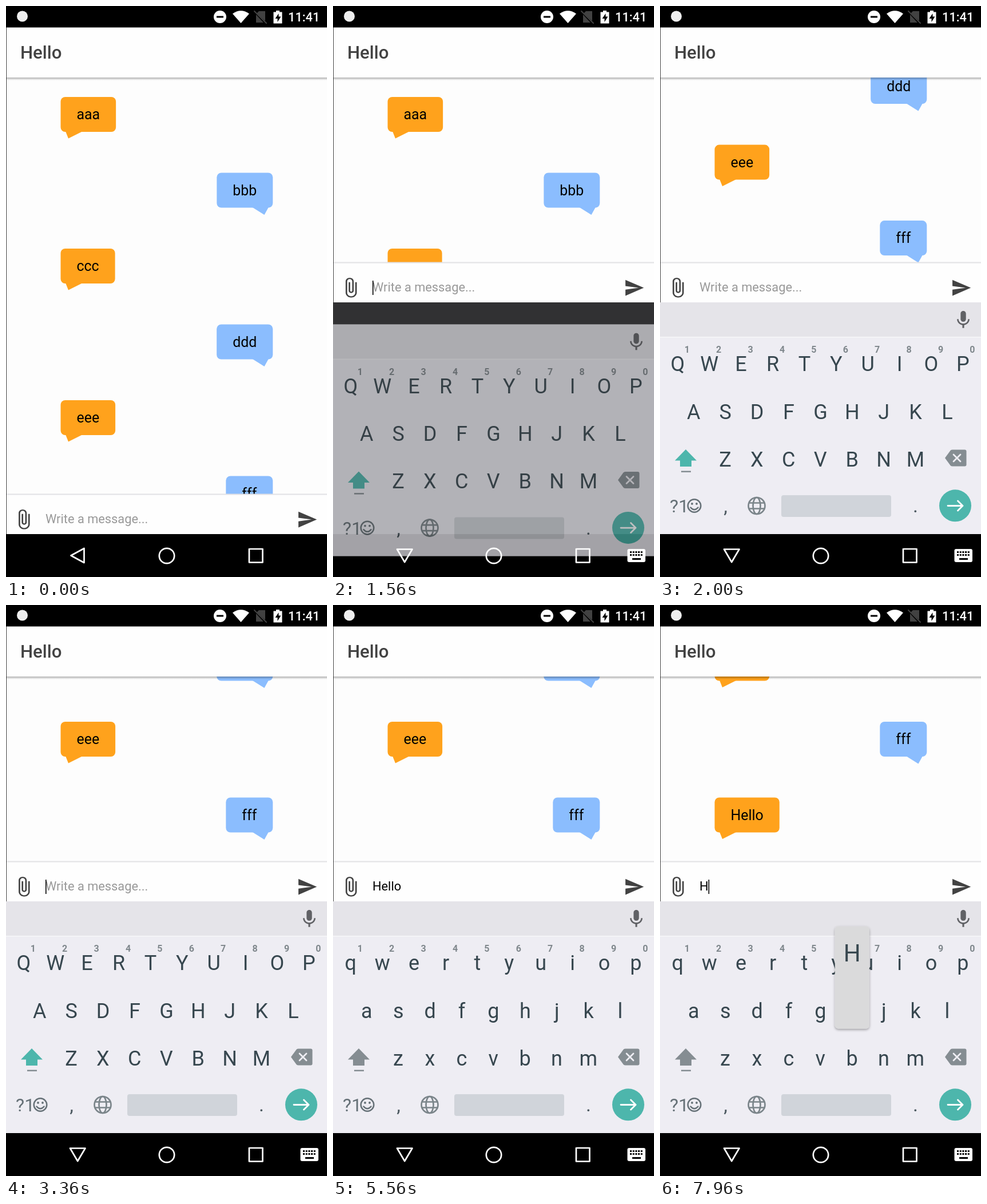
An HTML page for the animation above (8 s loop, 561x998 px).

```html
<!DOCTYPE html>
<html lang="en">
<head>
<meta charset="utf-8">
<title>Chat</title>
<style>
  html, body { margin: 0; width: 100%; height: 100%; overflow: hidden; background: #000; }
  svg { display: block; width: 100%; height: 100%; font-family: Roboto, sans-serif; }
  .mid { text-anchor: middle; }
  .key { font-size: 36px; fill: #37474f; }
  .hint { font-size: 16px; font-weight: 700; fill: #7f878c; }
  .line { fill: none; stroke-linejoin: round; stroke-linecap: round; }
</style>
</head>
<body>
<svg viewBox="0 0 561 998">
  <defs>
    <linearGradient id="down" x2="0" y2="1"><stop stop-color="#000" stop-opacity=".3"/><stop offset="1" stop-color="#000" stop-opacity="0"/></linearGradient>
    <clipPath id="view"><rect id="viewRect" y="125" width="561" height="729"/></clipPath>
    <filter id="lift" x="-20%" y="-10%" width="140%" height="120%"><feDropShadow dx="0" dy="2" stdDeviation="2" flood-opacity=".35"/></filter>
  </defs>

  <rect y="37" width="561" height="886" fill="#313133"/>
  <rect id="page" y="37" width="561" height="886" fill="#fdfdfd"/>
  <g clip-path="url(#view)"><g id="list"></g></g>

  <rect y="37.5" width="561" height="87.5" fill="#fefefe"/>
  <rect y="125" width="561" height="5" fill="url(#down)"/>
  <text x="24.9" y="92" font-size="31.2" font-weight="500" fill="#424242">Hello</text>

  <g id="bar">
    <rect y="853" width="561" height="70" fill="#fefefe"/>
    <rect y="852.5" width="561" height="2" fill="#e2e2e5"/>
    <path transform="translate(9.7 878.4) scale(1.77 1.57)" fill="#424242" d="M16.5 6v11.5c0 2.21-1.79 4-4 4s-4-1.79-4-4V5c0-1.38 1.12-2.5 2.5-2.5s2.5 1.12 2.5 2.5v10.5c0 .55-.45 1-1 1s-1-.45-1-1V6H10v9.5c0 1.38 1.12 2.5 2.5 2.5s2.5-1.12 2.5-2.5V5c0-2.21-1.79-4-4-4S7 2.79 7 5v12.5c0 3.04 2.46 5.5 5.5 5.5s5.5-2.46 5.5-5.5V6z"/>
    <text id="hintText" x="69" y="904" font-size="21.8" fill="#999">Write a message...</text>
    <text id="typed" x="69" y="904" font-size="21.8"></text>
    <rect id="caret" x="69" y="885" width="1.6" height="25"/>
    <path transform="translate(508 879) scale(1.53 1.55)" fill="#424242" d="M2 21 23 12 2 3v7l15 2-15 2z"/>
  </g>
  <rect y="37" width="1" height="886" fill="#444"/>

  <rect width="561" height="37.5"/>
  <g fill="#fff">
    <circle cx="28.5" cy="18" r="9.5" fill="#eee"/>
    <circle cx="374" cy="19" r="11"/>
    <rect x="368" y="17.5" width="12" height="3" fill="#000"/>
    <path d="M396 13.5Q410.500 3 425 13.500L410.500 30z"/>
    <path fill="#424242" d="M442 9h11v17l-15-13zM437 15l13 14H437z"/>
    <path class="line" stroke="#424242" stroke-width="2" d="m434 9 21 21"/>
    <path d="M472 8h6v2.500h4.500V30.500h-15V10.500H472z"/>
    <path fill="#000" d="M476.500 13 470.500 22h4v6l6-9.500h-4z"/>
    <text x="493" y="27" font-size="21.8" font-weight="500">11:41</text>
  </g>

  <rect y="923" width="561" height="75"/>
  <g id="board"></g>
  <g class="line" stroke="#fff" stroke-width="2.7">
    <path id="back"/>
    <circle cx="281" cy="961" r="13.200"/>
    <rect x="425" y="949" width="23.500" height="23.500"/>
  </g>
  <g id="imeIcon">
    <rect x="514.500" y="949" width="31.500" height="23" rx="3" fill="#fff"/>
    <path stroke="#000" stroke-width="3" stroke-dasharray="3 1.700" d="M519 954.500h23M519 959.500h23"/>
    <path stroke="#000" stroke-width="3" d="M523 966.500h15"/>
  </g>
  <g id="popup">
    <rect x="-30" width="60" height="179" rx="6" fill="#dadadb" filter="url(#lift)"/>
    <text id="popupText" class="mid" y="61" font-size="42" fill="#37474f"></text>
  </g>
</svg>
<script>
const $ = id => document.getElementById(id);
const LOOP = 8000, PITCH = 132.5, BAR_LIFT = 405;
const FOCUS = 1360, RESIZE = 1495, SENT = 6460;

// press, insert, release, character
const strokes = [
  [3530, 3630, 3700, 'H'],
  [3930, 4030, 4100, 'e'],
  [4460, 4530, 4600, 'l'],
  [4800, 4870, 4940, 'l'],
  [4960, 5060, 5130, 'o'],
  [7830, 7930, LOOP, 'H']
];

const rows = [
  { keys: 'qwertyuiop', x: 30.8, y: 638 },
  { keys: 'asdfghjkl', x: 58.8, y: 721.5 },
  { keys: 'zxcvbnm', x: 114, y: 804.5 }
];
const keyPos = {};

const bubble = (text, i) => {
  const right = i % 2;
  const y = 159 + i * PITCH;
  return `<g data-right="${right}" transform="translate(0 ${y})">
    <rect height="61" rx="8"/><path/>
    <text y="39" font-size="24.9" fill="#000">${text}</text></g>`;
};

function buildList() {
  $('list').innerHTML = ['aaa', 'bbb', 'ccc', 'ddd', 'eee', 'fff', 'Hello'].map(bubble).join('');
  for (const g of $('list').children) {
    const right = g.dataset.right === '1';
    const [box, tail, text] = g.children;
    const width = text.getComputedTextLength() + 56;
    const x = right ? 466.3 - width : 95.5;
    g.setAttribute('fill', right ? '#8bbdfe' : '#ffa21c');
    box.setAttribute('x', x);
    box.setAttribute('width', width);
    text.setAttribute('x', x + 28);
    tail.setAttribute('d', right ? 'M430 60 451.500 73.500 459 60z' : 'M104 60 109 72.500 134 60z');
  }
}

function buildBoard() {
  let letters = '';
  rows.forEach(({ keys, x, y }, r) => [...keys].forEach((c, i) => {
    const kx = x + i * 55.4;
    keyPos[c] = [kx, y];
    letters += `<text class="key mid letter" x="${kx}" y="${y}">${c}</text>`;
    if (r === 0) letters += `<text class="hint mid" x="${kx + 16.5}" y="606">${(i + 1) % 10}</text>`;
  }));
  $('board').innerHTML = `
    <rect y="518" width="561" height="405" fill="#eeedf3"/>
    <rect y="518" width="561" height="60" fill="#e5e4e9"/>
    <rect y="578" width="561" height="1.500" fill="#f7f7f9"/>
    <path transform="translate(511.300 530) scale(1.560)" fill="#606165" d="M12 14c1.660 0 3-1.340 3-3V5c0-1.660-1.340-3-3-3S9 3.340 9 5v6c0 1.660 1.340 3 3 3zm5.300-3c0 3-2.540 5.100-5.300 5.100S6.700 14 6.700 11H5c0 3.410 2.720 6.230 6 6.720V21h2v-3.280c3.280-.48 6-3.300 6-6.720z"/>
    ${letters}
    <path id="shift" d="M45 775 64 794.500H55V805H35V794.500H26z"/>
    <rect x="37" y="812.500" width="17" height="2.500" fill="#858d92"/>
    <path fill="#858d92" d="M498 790 507.500 777Q509 775.500 511 775.500H532.500Q535.500 775.500 535.500 778.500V801.500Q535.500 804.500 532.500 804.500H511Q509 804.500 507.500 803z"/>
    <path class="line" stroke="#eeedf3" stroke-width="2.800" d="m513 784 12 12m0-12-12 12"/>
    <text x="17" y="885" font-size="32" fill="#667177">?1</text>
    <g class="line" stroke="#667177" stroke-width="2.500">
      <circle cx="60" cy="873.500" r="11.300"/>
      <path d="M53.500 876.500q6.500 7.500 13 0"/>
    </g>
    <g fill="#667177"><circle cx="56" cy="870" r="1.900"/><circle cx="64" cy="870" r="1.900"/></g>
    <text class="mid" x="114.500" y="886" font-size="34" fill="#4d5a61">,</text>
    <text class="mid" x="446.500" y="885" font-size="34" fill="#4d5a61">.</text>
    <g class="line" stroke="#7b858a" stroke-width="2.700">
      <circle cx="169" cy="873.500" r="14.500"/><ellipse cx="169" cy="873.500" rx="6.500" ry="14.500"/>
      <path d="M156 868.500h26M156 878.500h26"/>
    </g>
    <rect x="212" y="855" width="192" height="38" rx="4" fill="#d0d4da"/>
    <circle cx="516" cy="873.300" r="28" fill="#4db6ac"/>
    <path class="line" stroke="#fff" stroke-width="2.800" d="M503 873.500h26m-8.500-8.500 8.500 8.500-8.500 8.500"/>`;
}

const progress = (t, start, length) => Math.min(1, Math.max(0, (t - start) / length));
const easeOut = (p, power) => 1 - (1 - p) ** power;
const show = (el, on) => el.setAttribute('visibility', on ? 'visible' : 'hidden');
let upper = null;

function setCase(on) {
  if (on === upper) return;
  upper = on;
  for (const el of document.querySelectorAll('.letter'))
    el.textContent = on ? el.textContent.toUpperCase() : el.textContent.toLowerCase();
  $('shift').setAttribute('fill', on ? '#4db6ac' : '#858d92');
}

function render(t) {
  const open = t >= RESIZE;
  const lift = open ? BAR_LIFT : 0;
  $('page').setAttribute('height', 886 - lift);
  $('viewRect').setAttribute('height', 728 - lift);
  $('bar').setAttribute('transform', `translate(0 ${-lift})`);
  $('back').setAttribute('d', open ? 'M112 949.500h26.500L125.200 972z' : 'M113.500 960.500 136.500 948v25z');
  show($('imeIcon'), open);

  const drop = 86 * (1 - easeOut(progress(t, RESIZE, 200), 2));
  $('board').setAttribute('transform', `translate(0 ${drop})`);
  $('board').setAttribute('opacity', easeOut(progress(t, RESIZE, 150), 2));

  const scroll = 485 * easeOut(progress(t, 1830, 300), 3) + PITCH * easeOut(progress(t, 6881, 300), 3);
  $('list').setAttribute('transform', `translate(0 ${-scroll})`);

  const since = t >= SENT ? SENT : 0;
  const done = strokes.filter(s => s[1] <= t && s[1] >= since);
  const text = done.map(s => s[3]).join('');
  $('typed').textContent = text;
  show($('hintText'), !text);
  setCase(!text);

  const lastEdit = done.length ? done[done.length - 1][1] : since || FOCUS;
  show($('caret'), t >= FOCUS && Math.floor((t - lastEdit) / 500) % 2 === 0);
  $('caret').setAttribute('x', 69 + (text ? $('typed').getComputedTextLength() : 0));

  const held = strokes.find(s => s[0] <= t && t < s[2]);
  show($('popup'), held);
  if (held) {
    const [x, y] = keyPos[held[3].toLowerCase()];
    $('popup').setAttribute('transform', `translate(${x} ${y - 160})`);
    $('popupText').textContent = held[3];
  }
}

buildList();
buildBoard();
const frame = () => {
  render(performance.now() % LOOP);
  requestAnimationFrame(frame);
};
frame();
</script>
</body>
</html>
```
